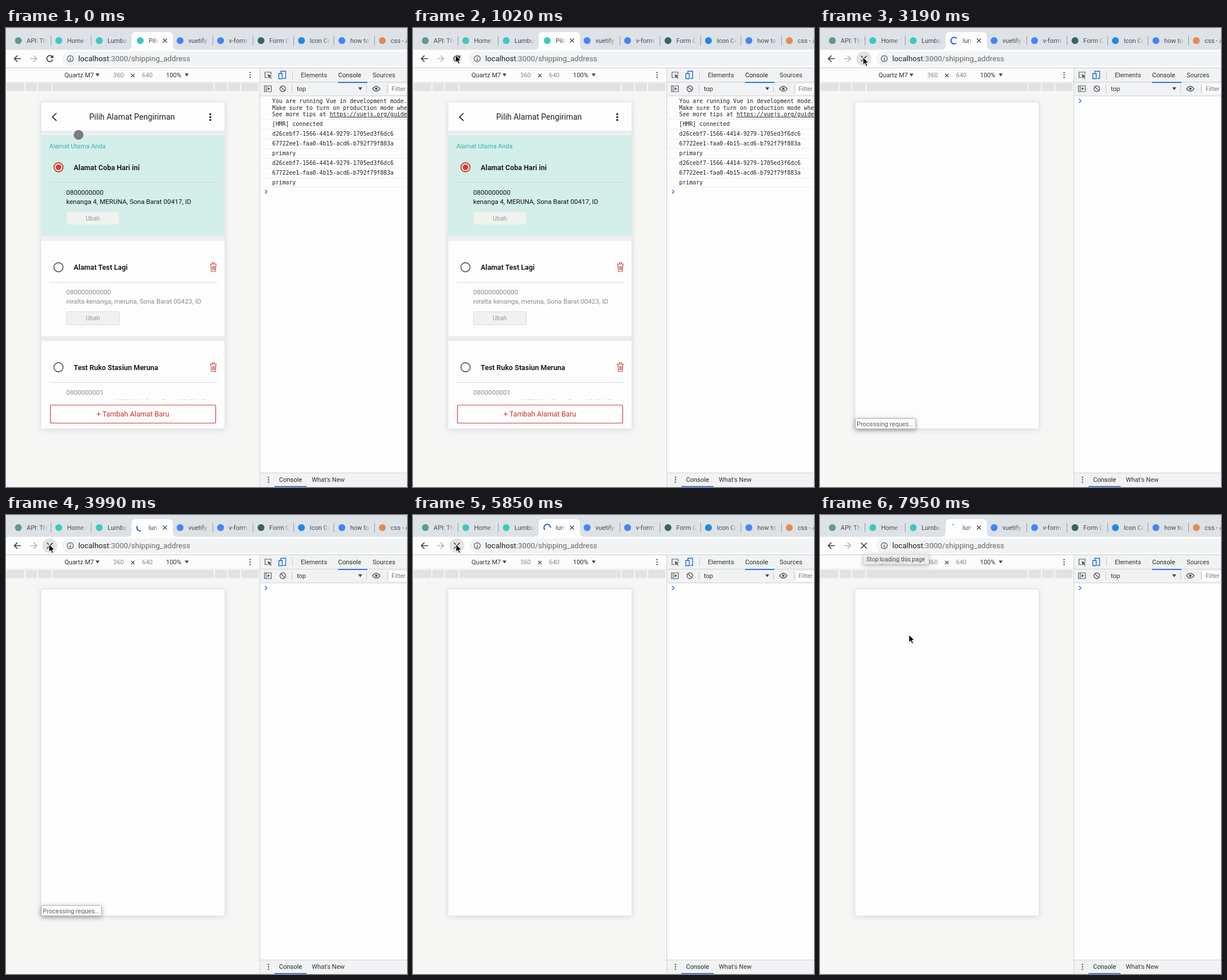
An HTML page for the animation above (8000 ms loop, 699x801 px).

```html
<!DOCTYPE html>
<html lang="id">
<head>
<meta charset="utf-8">
<title>Shipping address</title>
<style>
html, body { margin: 0; width: 100%; height: 100%; overflow: hidden; background: #f6f6f5; }
svg { display: block; font-family: Roboto, "Open Sans", sans-serif; }
.mono { font-family: "DejaVu Sans Mono", "Liberation Mono", monospace; }
.shadow { filter: drop-shadow(0 1px 4px #b4b4c070); }
.float { filter: drop-shadow(0 2px 4px #0005); }
</style>
</head>
<body>
<svg id="stage" width="699" height="801" viewBox="0 0 699 801"></svg>
<script>
const stage = document.getElementById('stage');
const rect = (x, y, w, h, fill, extra = '') =>
  `<rect x="${x}" y="${y}" width="${w}" height="${h}" fill="${fill}" ${extra}/>`;
const text = (x, y, s, size = 11, fill = '#333', extra = '') =>
  `<text x="${x}" y="${y}" font-size="${size}" fill="${fill}" ${extra}>${s}</text>`;
const dot = (x, y, r, fill, extra = '') => `<circle cx="${x}" cy="${y}" r="${r}" fill="${fill}" ${extra}/>`;
const line = (d, color, width = 1, extra = '') =>
  `<path d="${d}" fill="none" stroke="${color}" stroke-width="${width}" ${extra}/>`;
const group = (id, body, extra = '') => `<g id="${id}" ${extra}>${body}</g>`;
const dots = (x, y, gap, r, fill) => [-gap, 0, gap].map(d => dot(x, y + d, r, fill)).join('');
const drop = (x, y) => `<path d="M${x - 3.5} ${y - 2.5}h7l-3.5 5z" fill="#444"/>`;
const mono = (x, y, s, extra = '') => text(x, y, s, 9.78, '#222', `class="mono" ${extra}`);

function tabStrip() {
  const tabs = [
    ['API: The', '#5f9a8f'], ['Home S', '#3ec8c0'], ['Lumbu', '#3ec8c0'], null, ['vuetify', '#4285f4'],
    ['v-form', '#4285f4'], ['Form C', '#3a655c'], ['Icon Co', '#1e88e5'], ['how to', '#4285f4'], ['css - A', '#e58a4e']
  ];
  let out = rect(0, 0, 699, 38, '#dde2e6');
  tabs.forEach((tab, i) => {
    if (!tab) return;
    const x = 21.5 + i * 70.5;
    out += dot(x, 22, 6, tab[1]) + text(x + 14.5, 26, tab[0], 11, '#45494d')
      + rect(x + 38, 14, 12, 16, 'url(#fadeTab)') + rect(x + 50, 12, 22, 20, '#dde2e6');
    if (i !== 2) out += line(`M${Math.round(x + 56) + .5} 14v16`, '#96999d');
  });
  out += '<path d="M211 38q8 0 8-8V15q0-8 8-8h56q8 0 8 8v15q0 8 8 8z" fill="#fdfdfd"/>';
  out += group('icon', dot(234, 22, 6, '#3ec8c0')) + line('', '#2f6fdc', 2.2, 'id="spinner"')
    + '<text id="title" x="248.5" y="26" font-size="11" fill="#45494d"></text>'
    + rect(258, 14, 8, 16, 'url(#fadeActive)') + rect(266, 14, 6, 16, '#fdfdfd')
    + line('M273.500 18.500l7 7m0-7l-7 7', '#45494d', 1.4);
  return out;
}

function addressBar() {
  return rect(0, 38, 699, 31, '#fdfdfd') + rect(98, 41, 640, 25, '#f1f3f4', 'rx="12.5"') + line('M0 69.500h699', '#c9cbd0')
    + line('M26 53.500H14.500m5.500-5.500l-5.500 5.500 5.500 5.500', '#3c4043', 1.7)
    + line('M42 53.500h11.500m-5.500-5.500l5.500 5.500-5.500 5.500', '#b4b7ba', 1.7)
    + group('hover', dot(76.5, 53.5, 13, '#e2e3e5'))
    + group('reload', line('M80.500 50A5.300 5.300 0 1 0 81.500 55', '#3c4043', 1.7) + '<path d="M82.500 47v5.500H77z" fill="#3c4043"/>')
    + group('stop', line('M71.500 48.500l10 10m0-10l-10 10', '#3c4043', 1.7))
    + line('M112 53v4', '#5f6368', 1.6) + dot(112, 53.5, 5.3, 'none', 'stroke="#5f6368" stroke-width="1.300"') + dot(112, 50.7, .9, '#5f6368')
    + text(126, 58, 'localhost<tspan fill="#666a6e">:3000/shipping_address</tspan>', 13.2, '#202124');
}

function deviceBar() {
  let out = rect(0, 70, 442, 731, '#f6f6f5') + rect(0, 70, 442, 24, '#fcfcfa') + line('M0 94.500h442', '#e6e6e6');
  out += text(102, 86, 'Quartz M7') + drop(159.5, 82) + text(187, 86, '360', 11, '#8a8a8a')
    + line('M218 80l6 6m0-6l-6 6', '#444', 1.1) + text(237, 86, '640', 11, '#8a8a8a')
    + text(279, 86, '100%') + drop(315, 82) + dots(425.5, 82, 4.3, 1.2, '#555');
  const marks = [1, 34, 56, 81, 364, 387, 410, 442];
  for (let i = 0; i < 7; i++) out += rect(marks[i], 96, marks[i + 1] - marks[i] - 2, 14, '#e2e2e2');
  return out + rect(61, 129.5, 320.5, 570, '#fdfdfd', 'class="shadow" stroke="#e2e2e8" stroke-width=".8"');
}

function card(y, name, phone, place, main) {
  const ink = main ? '#111' : '#8c8c8c', ring = main ? '#dd3a2e' : '#666';
  let out = dot(91.5, y, 8, 'none', `stroke="${ring}" stroke-width="1.800"`)
    + text(118, y + 4.5, name, 12.44, '#222', 'font-weight="700"')
    + line(`M76 ${y + 26.5}h292`, main ? '#c6dcda' : '#d9d9d9')
    + text(105, y + 47.5, phone, 11.56, ink) + text(105, y + 63.5, place, 11.56, ink)
    + rect(105.5, y + 77.5, 92, 23, main ? '#eef3ee' : '#f1f1f2', `rx="2" stroke="${main ? '#e0e8e2' : '#dadada'}"`)
    + text(139, y + 92.5, 'Ubah', 10.7, '#969696');
  if (main) out += dot(91.5, y, 4.8, ring);
  else out += line(`M355.500 ${y - 5.500}h12m-8-.5v-2h4v2m-6.500 1l1 12.500h7l1-12.500m-6.300 2.500l.4 7.500m3.400 0l.4-7.500m-2.100 0v7.500`, '#cb4a4f', 1.1);
  return out;
}

function page() {
  return rect(61.5, 180, 319.5, 7, '#efeff2') + line('M61 180.500h320', '#dadade')
    + line('M88 148.500l-7 6.700 7 6.700', '#222', 1.7) + text(145, 159.5, 'Pilih Alamat Pengiriman', 14, '#222')
    + dots(356, 155.5, 5, 1.8, '#222')
    + rect(61.5, 187, 319.5, 176, '#d4eeea') + rect(61.5, 363, 319.5, 9, '#f0f0f2') + rect(61.5, 538, 319.5, 8, '#ececef')
    + text(75.5, 210, 'Alamat Utama Anda', 11, '#35b5ad')
    + card(243, 'Alamat Coba Hari ini', '0800000000', 'kenanga 4, MERUNA, Sona Barat 00417, ID', true)
    + card(417.5, 'Alamat Test Lagi', '080000000000', 'niralta kenanga, meruna, Sona Barat 00423, ID')
    + `<g clip-path="url(#list)">${card(592, 'Test Ruko Stasiun Meruna', '0800000001', 'stasiun meruna, MERUNA, Sona Barat 00431, ID')}</g>`
    + rect(77.5, 658, 288, 31.5, '#fdfdfd', 'rx="2" stroke="#c5413f" stroke-width="1.200"')
    + text(158, 678, '+ Tambah Alamat Baru', 12.44, '#c5352f');
}

function devtools() {
  const grey = '#5a5d61', blue = '#1a66d6', bar = '#f1f2f3', rule = '#cfd1d4';
  return rect(442, 70, 257, 731, '#fdfdfd') + rect(442, 70, 257, 48, bar) + rect(442, 776, 257, 25, bar)
    + line('M442.500 70v731M442 94.500h257M442 118.500h257M442 776.500h257', rule)
    + line('M499.500 75v14M498.500 99v14M628.500 99v14M664.500 99v14', '#c8c8c8')
    + line('M456 86.500h-4.500v-9.500h10.500v4', grey, 1.2) + `<path d="M456 80.500l7.500 3-3 1.200 2.500 3-1.300 1-2.400-3-1.800 2z" fill="${grey}"/>`
    + line('M479 80v-4.500h8.500v12.500h-4M475.500 79.500h6v9h-6z', blue, 1.3)
    + text(514, 85.5, 'Elements') + text(579, 85.5, 'Console', 11, '#222') + text(639, 85.5, 'Sources') + rect(579, 94, 51, 1.8, blue)
    + line('M450.500 101h12v10h-12zM453.500 101v10', grey, 1.2) + `<path d="M456 103.200v5.600l4.500-2.800z" fill="${grey}"/>`
    + dot(482.5, 106, 5, 'none', `stroke="${grey}" stroke-width="1.400"`) + line('M479 102.500l7 7', grey, 1.4)
    + text(507, 110, 'top') + drop(617.5, 106)
    + line('M639 106q6.500-8.500 13 0q-6.500 8.500-13 0z', grey, 1.4) + dot(645.5, 106, 2.3, grey)
    + rect(668, 98, 40, 17, '#fff') + text(672, 110, 'Filter', 11, '#777')
    + dots(457.5, 788.5, 4.3, 1.2, grey) + text(476, 792, 'Console', 11, '#222') + text(533, 792, "What's New") + rect(468, 799.5, 56, 1.5, blue);
}

function log() {
  const ids = ['d26cebf7-1566-4414-9279-1705ed3f6dc6', '67722ee1-faa0-4b15-acd6-b792f79f883a', 'primary'];
  let out = mono(464, 131, 'You are running Vue in development mode.')
    + mono(464, 142.5, 'Make sure to turn on production mode when deploying.')
    + mono(464, 154, 'See more tips at <tspan text-decoration="underline">https://vuejs.org/guide</tspan>');
  ['[HMR] connected', ...ids, ...ids].forEach((s, i) => {
    const y = 171 + i * 16.95;
    out += mono(464, y, s) + line(`M443 ${Math.round(y - 12) + .5}h256`, '#ededf0');
  });
  return out + line('M443 277.500h256', '#ededf0');
}

const gradient = (id, color) => `<linearGradient id="${id}"><stop stop-color="${color}" stop-opacity="0"/><stop offset="1" stop-color="${color}"/></linearGradient>`;
stage.innerHTML = `<defs>${gradient('fadeTab', '#dde2e6')}${gradient('fadeActive', '#fdfdfd')}
  <clipPath id="list">${rect(61, 546, 320, 102.5, '#000')}</clipPath></defs>`
  + tabStrip() + addressBar() + deviceBar() + group('page', page()) + devtools() + group('log', log())
  + line('M451.500 282.500l3.500 3.300-3.500 3.300', '#2f78e4', 1.5, 'id="prompt"')
  + group('status', rect(61.5, 681.5, 105, 18, '#fdfdfd', 'rx="2" stroke="#b0b0b0" class="float"')
    + '<text id="statusText" x="64" y="694.500" font-size="11" fill="#5c5f63"></text>')
  + group('tip', rect(76, 69, 114, 17, '#ecebe9', 'stroke="#c4c4c4" stroke-width=".6" class="float"') + text(81, 81, 'Stop loading this page', 10.3, '#333'))
  + group('touch', dot(0, 0, 8, '#7b7d80', 'stroke="#66686c" stroke-width=".8"'))
  + group('arrow', '<path d="M0 0v13.500l3.100-2.900 2.200 5 2.300-1-2.200-4.800h4.200z" fill="#000" stroke="#fff" stroke-width="1"/>');

const el = Object.fromEntries([...stage.querySelectorAll('[id]')].map(e => [e.id, e]));
const show = (e, on) => e.setAttribute('opacity', +on);
const ramp = (t, a, b) => Math.min(1, Math.max(0, (t - a) / (b - a)));
const smooth = p => p * p * (3 - 2 * p);

const holds = [[400, 570], [1340, 1440], [2020, 2170], [2190, 2490], [3190, 3290], [4030, 4130],
  [4870, 4970], [5710, 5810], [5850, 5950], [6550, 6650], [7390, 7490], [7950, 8000]];
const path = [[20, 126.5, 186.5], [400, 100, 112], [570, 100, 112], [980, 74, 47], [1340, 74, 47],
  [1500, 75, 51], [6950, 75, 51], [7350, 155, 209]];

function pointer(t) {
  let [, x, y] = path[0];
  for (let i = 1; i < path.length; i++) {
    const [a, x0, y0] = path[i - 1], [b, x1, y1] = path[i];
    if (t < a) break;
    const p = smooth(ramp(t, a, b));
    x = x0 + (x1 - x0) * p;
    y = y0 + (y1 - y0) * p;
  }
  return [x, y];
}

function arc(from, sweep) {
  const at = deg => {
    const a = deg * Math.PI / 180;
    return `${234 + 5.7 * Math.cos(a)} ${22 + 5.7 * Math.sin(a)}`;
  };
  return `M${at(from)}A5.700 5.700 0 ${sweep > 180 ? 1 : 0} 1 ${at(from + sweep)}`;
}

// fast out, slow in: bezier(.4, 0, .2, 1) solved by bisection
function ease(x) {
  let lo = 0, hi = 1;
  for (let i = 0; i < 20; i++) {
    const s = (lo + hi) / 2, r = 1 - s;
    if (1.2 * r * r * s + .6 * r * s * s + s * s * s < x) lo = s; else hi = s;
  }
  return lo * lo * (3 - 2 * lo);
}

function spinner(t) {
  if (t < 2490) return arc(-90 - (t - 2190) * .57, 90);
  const u = (t - 4513) / 634, k = Math.floor(u), f = u - k;
  const start = 112 + .421 * (t - 4830) + 270 * k;
  if (f >= .5) return arc(start, Math.max(14, 270 * ease(2 * f - 1)));
  const sweep = Math.max(14, 270 * (1 - ease(2 * f)));
  return arc(start - sweep, sweep);
}

function draw(time) {
  let t = time % 8000;
  const hold = holds.find(([a, b]) => t >= a && t < b);
  if (hold) t = hold[0];
  const busy = t >= 2170, blank = t >= 2490;
  show(el.icon, !busy);
  show(el.spinner, busy);
  if (busy) el.spinner.setAttribute('d', spinner(t));
  el.title.textContent = busy ? 'lum' : 'Pilih';
  show(el.page, !blank);
  show(el.log, !blank);
  el.prompt.setAttribute('transform', `translate(0 ${blank ? -158.5 : 0})`);
  show(el.reload, !blank);
  show(el.stop, blank);
  show(el.hover, ramp(t, 1100, 1300) * (1 - ramp(t, 7000, 7150)));
  show(el.status, blank ? 1 - ramp(t, 5300, 5500) : 0);
  el.statusText.textContent = t < 4400 ? 'Processing reques...' : 'Waiting for localho...';
  show(el.tip, t < 6800 ? 0 : 1 - .12 * ramp(t, 7800, 7950));
  const [x, y] = pointer(t), touching = t < 400 && y > 130;
  show(el.touch, touching);
  show(el.arrow, !touching);
  for (const e of [el.touch, el.arrow]) e.setAttribute('transform', `translate(${x} ${y})`);
}

const begin = performance.now();
function tick() {
  draw(performance.now() - begin);
  requestAnimationFrame(tick);
}
tick();
</script>
</body>
</html>
```
